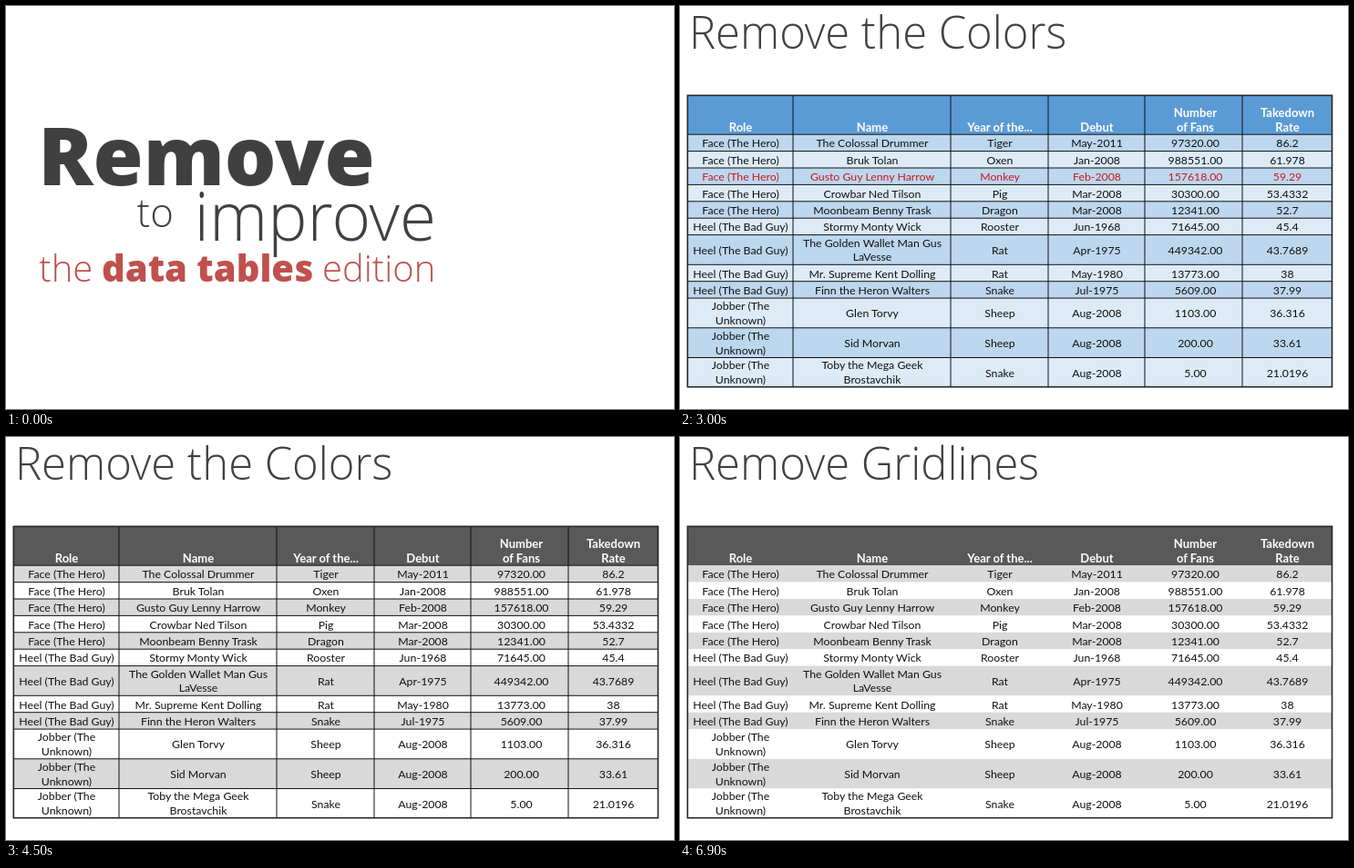
These frames come from a looping animation (733x443 px, 8000 ms). An HTML page:

```html
<!DOCTYPE html>
<html lang="en">
<head>
<meta charset="utf-8">
<title>Remove to improve</title>
<style>
  html, body { margin: 0; width: 100%; height: 100%; overflow: hidden; background: #fff; }
  svg { display: block; width: 733px; height: 443px; }
  .display { font-family: "Open Sans", sans-serif; font-weight: 300; fill: #404040; }
  .heavy { font-weight: 800; }
  .red { fill: #c0504d; }
  .pen { fill: none; stroke: #c0504d; stroke-width: 2.5; stroke-linecap: round; stroke-linejoin: round; }
  .cells { font: 12.3px Lato, sans-serif; text-anchor: middle; fill: #111; }
  .cells .head { font-size: 13px; font-weight: 700; fill: #fff; }
  .grid { stroke: #111; stroke-width: 1; }
  .frame { fill: none; stroke: #262626; stroke-width: 1.6; }
  .bar { fill: #595959; }
  .odd { fill: #d9d9d9; }
  .even { fill: #fff; }
  .color .bar { fill: #5b9bd5; }
  .color .odd { fill: #bdd7ee; }
  .color .even { fill: #ddebf7; }
  .color .marked { fill: #c8181c; }
</style>
</head>
<body>
<svg id="stage" viewBox="0 0 733 443">
  <g id="cover" class="display">
    <text class="heavy" x="35.2" y="196.500" font-size="89.2">Remove</text>
    <text x="143.500" y="243" font-size="43.8">to</text>
    <text x="206.500" y="258" font-size="72.8">improve</text>
    <g class="red" font-size="40">
      <text x="36.3" y="303">the</text>
      <text class="heavy" x="105" y="303">data tables</text>
      <text x="347" y="303">edition</text>
    </g>
  </g>
  <g id="note" class="pen" role="img" aria-label="and move">
    <g transform="translate(387 134) rotate(15.5)">
      <path d="M2-15C5-19 12-19 12-13V-4Q12-2 14-2M12-11C6-12 1-9 2-5C3-1 10-2 12-7"/>
      <path d="M20-17V-2M20-11C23-18 32-20 32-12V-2"/>
      <path d="M50-14C45-19 38-15 38-9C38-1 47 0 50-7M50-25V-2"/>
      <path d="M66-17V-2M66-11C69-18 76-19 76-12V-2M76-11C79-18 87-19 87-12V-2"/>
      <path d="M99-17C90-16 90-2 98-2C108-2 108-18 99-17"/>
      <path d="M109-17L115-2L121-17"/>
      <path d="M126-10H139C139-20 126-20 126-9C126 0 136-1 140-4"/>
    </g>
    <path d="M428.5 161.5Q430 170 433 174.5Q437 169.5 442.5 167.5"/>
  </g>
  <g id="sheet">
    <text id="title" class="display" x="10" y="47" font-size="48.95"></text>
    <g id="fills"></g>
    <g id="grid" class="grid"></g>
    <rect class="frame" x="8.3" y="98.3" width="707.2" height="320.4"/>
    <g id="cells" class="cells"></g>
  </g>
</svg>
<script>
const $ = id => document.getElementById(id);

function add(parent, tag, attrs, text = "") {
  const el = document.createElementNS("http://www.w3.org/2000/svg", tag);
  for (const key in attrs) el.setAttribute(key, attrs[key]);
  el.textContent = text;
  parent.append(el);
  return el;
}

const LEFT = 8, RIGHT = 716, TOP = 98, HEAD = 43.2, SINGLE = 18.4, DOUBLE = 32.7;
const dividers = [124, 297, 404, 510, 617];
const centers = [66.5, 211, 351, 457.5, 565.5, 666.5];

// A slash breaks a cell into two lines.
const heads = "Role|Name|Year of the...|Debut|Number/of Fans|Takedown/Rate";
const roles = { F: "Face (The Hero)", H: "Heel (The Bad Guy)", J: "Jobber (The/Unknown)" };
const rows = [
  "F|The Colossal Drummer|Tiger|May-2011|97320.00|86.2",
  "F|Bruk Tolan|Oxen|Jan-2008|988551.00|61.978",
  "F|Gusto Guy Lenny Harrow|Monkey|Feb-2008|157618.00|59.29",
  "F|Crowbar Ned Tilson|Pig|Mar-2008|30300.00|53.4332",
  "F|Moonbeam Benny Trask|Dragon|Mar-2008|12341.00|52.7",
  "H|Stormy Monty Wick|Rooster|Jun-1968|71645.00|45.4",
  "H|The Golden Wallet Man Gus/LaVesse|Rat|Apr-1975|449342.00|43.7689",
  "H|Mr. Supreme Kent Dolling|Rat|May-1980|13773.00|38",
  "H|Finn the Heron Walters|Snake|Jul-1975|5609.00|37.99",
  "J|Glen Torvy|Sheep|Aug-2008|1103.00|36.316",
  "J|Sid Morvan|Sheep|Aug-2008|200.00|33.61",
  "J|Toby the Mega Geek/Brostavchik|Snake|Aug-2008|5.00|21.0196"
];
const marked = 2;

function addCell(text, x, lastBaseline, cls) {
  const lines = text.split("/");
  lines.forEach((line, i) => add($("cells"), "text", {
    x, y: lastBaseline - (lines.length - 1 - i) * 15.8, class: cls
  }, line));
}

function addFill(y, height, cls) {
  add($("fills"), "rect", { x: LEFT, y, width: RIGHT - LEFT, height, class: cls });
}

function addLine(x1, y1, x2, y2) {
  add($("grid"), "line", { x1, y1, x2, y2 });
}

addFill(TOP, HEAD, "bar");
heads.split("|").forEach((text, c) => addCell(text, centers[c], 137.5, "head"));

let y = TOP + HEAD;
rows.forEach((row, r) => {
  const values = row.split("|");
  values[0] = roles[values[0]];
  const height = values.some(v => v.includes("/")) ? DOUBLE : SINGLE;
  addFill(y, height, r % 2 ? "even" : "odd");
  addLine(LEFT, y, RIGHT, y);
  values.forEach((text, c) => {
    const shift = text.includes("/") ? 12.4 : 5;
    addCell(text, centers[c], y + height / 2 + shift, r === marked ? "marked" : "");
  });
  y += height;
});
for (const x of dividers) addLine(x, TOP, x, y);

const COLORS = "Remove the Colors", LINES = "Remove Gridlines";
const steps = [
  { at: 0 },
  { at: 1000, note: true },
  { at: 3000, title: COLORS, color: true, grid: true },
  { at: 4500, title: COLORS, grid: true },
  { at: 5700, title: LINES, grid: true },
  { at: 6900, title: LINES }
];
const LOOP = 8000;
const start = performance.now();
let current;

function show(id, on) {
  $(id).style.display = on ? "" : "none";
}

function render(time) {
  const step = steps.findLast(s => s.at <= time);
  if (step === current) return;
  current = step;
  show("cover", !step.title);
  show("note", step.note);
  show("sheet", step.title);
  show("grid", step.grid);
  $("title").textContent = step.title || "";
  $("sheet").classList.toggle("color", !!step.color);
}

function tick(now) {
  render(Math.max(0, now - start) % LOOP);
  requestAnimationFrame(tick);
}

render(0);
requestAnimationFrame(tick);
</script>
</body>
</html>
```
